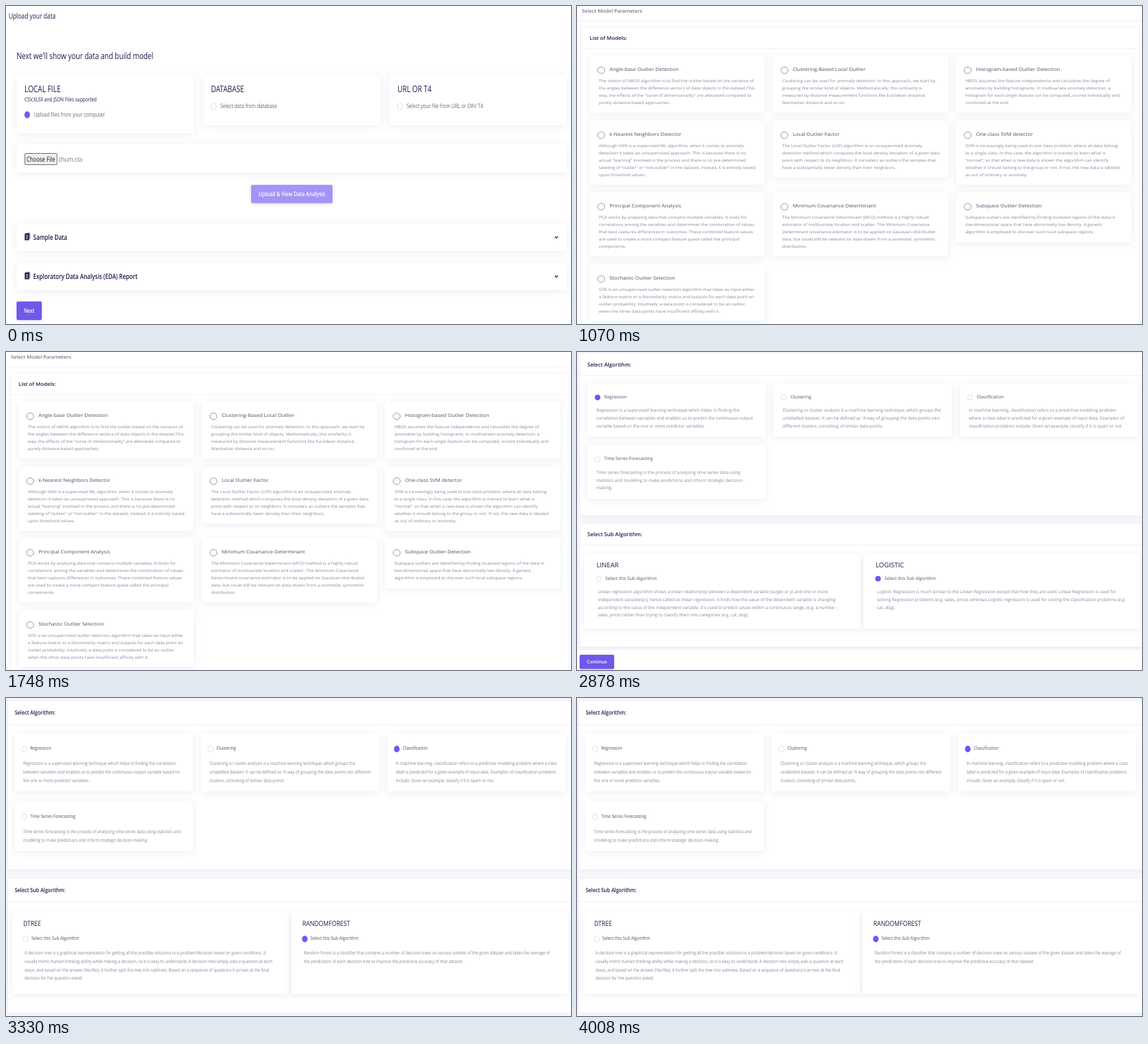
These frames come from a looping animation (853x480 px, 4.46 s). An HTML page:

```html
<!DOCTYPE html>
<html lang="en">
<head>
<meta charset="utf-8">
<title>Model builder walkthrough</title>
<style>
  html, body { margin: 0; width: 100%; height: 100%; overflow: hidden; background: #fff; }
  svg { position: absolute; left: 0; top: 0; width: 853px; height: 480px; }
  text { font-family: "Open Sans", "Noto Sans", sans-serif; text-rendering: geometricPrecision; white-space: pre; }
  .card { fill: #fff; filter: drop-shadow(0 2px 6px rgba(84, 92, 170, .11)); }
  .panel { fill: #fff; filter: drop-shadow(0 1px 4px rgba(84, 92, 170, .12)); }
  .btn { filter: drop-shadow(0 1px 2px rgba(90, 70, 200, .25)); }
</style>
</head>
<body>
<script>
const NS = "http://www.w3.org/2000/svg";
const INK = "#21184c", LABEL = "#4c4a68", SOFT = "#85849b", VIOLET = "#6f57ee";

function add(parent, tag, attrs, content) {
  const node = document.createElementNS(NS, tag);
  for (const key in attrs) node.setAttribute(key, attrs[key]);
  if (content) node.textContent = content;
  parent.appendChild(node);
  return node;
}

// One screen; tall is the height-to-width ratio of everything on it.
function makeScreen(tall, back = "#fff") {
  const svg = add(document.body, "svg", { viewBox: "0 0 853 480" });
  const box = (x1, y1, x2, y2, attrs) =>
    add(svg, "rect", { x: x1, y: y1, width: x2 - x1, height: y2 - y1, ...attrs });
  box(0, 0, 853, 480, { fill: back });

  const text = (x, midY, size, str, fill = INK, weight = 400, anchor = "start") =>
    add(svg, "text", {
      transform: `translate(${x} ${midY + 0.33 * size * tall}) scale(1 ${tall})`,
      "font-size": size, "font-weight": weight, fill, "text-anchor": anchor
    }, str);

  return {
    svg, box, text,
    card: (x1, y1, x2, y2) => box(x1, y1, x2, y2, { class: "card", rx: 2 }),
    panel: (x1, y1, x2, y2) => box(x1, y1, x2, y2, { class: "panel", rx: 2 }),
    rule: (x1, x2, y) => box(x1, y, x2, y + 1, { fill: "#f1f1f7" }),
    lines: (x, y, step, size, str, fill = SOFT) =>
      str.split("|").forEach((line, i) => text(x, y + i * step, size, line, fill)),
    radio: (cx, cy, rx, ry, on, stroke = "#d6d6df") =>
      add(svg, "ellipse", { cx, cy, rx, ry, fill: on ? VIOLET : "#fff", stroke: on ? VIOLET : stroke, "stroke-width": .8 }),
    button(x1, y1, x2, y2, size, str, fill) {
      box(x1, y1, x2, y2, { class: "btn", rx: 2, fill });
      text((x1 + x2) / 2, (y1 + y2) / 2, size, str, "#fff", 600, "middle");
    }
  };
}

function uploadScreen() {
  const s = makeScreen(1.3);
  s.text(4, 15, 8.78, "Upload your data");
  s.text(16, 75.5, 10.43, "Next we'll show your data and build model");

  const sources = [
    [16, 192, "LOCAL FILE", "Upload files from your computer", 163.5],
    [297.5, 180, "DATABASE", "Select data from database", 151],
    [579, 180, "URL OR T4", "Select your file from URL or OKV T4", 151]
  ];
  sources.forEach(([x, bottom, head, label, y], i) => {
    s.card(x, 104, x + 267.5, bottom);
    s.text(x + 12, 125, 10.5, head);
    s.radio(x + 16, y + .7, 3.8, 4.9, i === 0);
    s.text(x + 26, y, 7.05, label, "#65637d");
  });
  s.text(28, 141, 6.69, "CSV,XLSX and JSON Files supported");

  s.card(16, 208, 847, 252);
  s.box(28.5, 222.5, 77, 239.5, { fill: "#efefef", stroke: "#6b6b6b", rx: 1 });
  s.text(31, 231.5, 8.06, "Choose File", "#16161c");
  s.text(79.5, 231.5, 8.1, "churn.csv", "#62728a");
  s.button(370, 270, 493, 297.5, 7.3, "Upload & View Data Analysis", "#a594f5");

  [[328, "Sample Data"], [387, "Exploratory Data Analysis (EDA) Report"]].forEach(([y, str]) => {
    s.card(16, y, 847, y + 42);
    s.box(30, y + 14.3, 36.5, y + 23.5, { fill: "#8d88ab" });
    s.box(28.3, y + 15.5, 35, y + 25.5, { fill: INK });
    for (const dy of [18, 20.3, 22.6]) s.box(30, y + dy, 33.4, y + dy + .9, { fill: "#fff" });
    s.text(41, y + 21.3, 8.43, str, INK, 600);
    add(s.svg, "path", {
      d: `M828.8 ${y + 19.8}l2.2 2.6 2.2-2.6`, fill: "none", stroke: "#39355a", "stroke-width": 1.5
    });
  });
  s.button(16, 446, 54, 474, 7.1, "Next", "#7158e8");
  return s.svg;
}

function modelScreen() {
  const s = makeScreen(.9);
  s.text(7.5, 8, 7.85, "Select Model Parameters", LABEL);
  s.rule(0, 853, 22);
  s.panel(8, 33, 848, 490);
  s.text(19, 49, 8.1, "List of Models:", INK, 600);
  s.rule(8, 848, 64);

  const rows = [[75, 161, 161, 161], [173, 270, 259, 270], [281, 378, 378, 357], [390, 475]];
  const models = [
    ["Angle-base Outlier Detection", "The notion of ABOD algorithm is to find the outlier based on the variance of|the angles between the difference vectors of data objects in the dataset.This|way, the effects of the “curse of dimensionality” are alleviated compared to|purely distance-based approaches."],
    ["Clustering-Based Local Outlier", "Clustering can be used for anomaly detection. In this approach, we start by|grouping the similar kind of objects. Mathematically, this similarity is|measured by distance measurement functions like Euclidean distance,|Manhattan distance and so on."],
    ["Histogram-based Outlier Detection", "HBOS assumes the feature independence and calculates the degree of|anomalies by building histograms. In multivariate anomaly detection, a|histogram for each single feature can be computed, scored individually and|combined at the end."],
    ["k-Nearest Neighbors Detector", "Although kNN is a supervised ML algorithm, when it comes to anomaly|detection it takes an unsupervised approach. This is because there is no|actual “learning” involved in the process and there is no pre-determined|labeling of “outlier” or “not-outlier” in the dataset, instead, it is entirely based|upon threshold values."],
    ["Local Outlier Factor", "The Local Outlier Factor (LOF) algorithm is an unsupervised anomaly|detection method which computes the local density deviation of a given data|point with respect to its neighbors. It considers as outliers the samples that|have a substantially lower density than their neighbors."],
    ["One-class SVM detector", "SVM is increasingly being used in one class problem, where all data belong|to a single class. In this case, the algorithm is trained to learn what is|“normal”, so that when a new data is shown the algorithm can identify|whether it should belong to the group or not. If not, the new data is labeled|as out of ordinary or anomaly."],
    ["Principal Component Analysis", "PCA works by analyzing data that contains multiple variables. It looks for|correlations among the variables and determines the combination of values|that best captures differences in outcomes. These combined feature values|are used to create a more compact feature space called the principal|components."],
    ["Minimum Covariance Determinant", "The Minimum Covariance Determinant (MCD) method is a highly robust|estimator of multivariate location and scatter. The Minimum Covariance|Determinant covariance estimator is to be applied on Gaussian-distributed|data, but could still be relevant on data drawn from a unimodal, symmetric|distribution."],
    ["Subspace Outlier Detection", "Subspace outliers are identified by finding localized regions of the data in|low-dimensional space that have abnormally low density. A genetic|algorithm is employed to discover such local subspace regions."],
    ["Stochastic Outlier Selection", "SOS is an unsupervised outlier-selection algorithm that takes as input either|a feature matrix or a dissimilarity matrix and outputs for each data point an|outlier probability. Intuitively, a data point is considered to be an outlier|when the other data points have insufficient affinity with it."]
  ];
  models.forEach(([name, about], i) => {
    const col = i % 3, row = rows[Math.floor(i / 3)], top = row[0];
    const x = 19 + 276.7 * col;
    s.card(x, top, x + 264.5, row[col + 1]);
    s.radio(x + 17.5, top + 22, 5.3, 5, false, "#7c7c86");
    s.text(x + 30, top + 20.3, 7.82, name, LABEL);
    s.lines(x + 14, top + 38.5, 10.8, 6.66, about);
  });
  return s.svg;
}

// Algorithm picker: o holds the screen's geometry, type sizes and content.
function pickScreen(o) {
  const s = makeScreen(o.tall, "#f9f9fc");
  const { label, body, head, title } = o.size;
  const ry = 3.9 * o.tall;

  o.panels.forEach(([top, bottom, ruleY, titleY, str]) => {
    s.panel(o.left, top, 860, bottom);
    s.rule(o.left, 853, ruleY);
    s.text(o.cardX, titleY, title, str, INK, 600);
  });

  o.algos.forEach(([name, about], i) => {
    const x = o.cardX + 281.2 * (i % 3), [top, bottom] = o.rows[i < 3 ? 0 : 1];
    s.card(x, top, x + 269, bottom);
    s.radio(x + o.radioX, top + o.labelY + .9, 3.9, ry, i === o.chosen);
    s.text(x + o.labelX, top + o.labelY, label, name, LABEL);
    s.lines(x + o.bodyX, top + o.bodyY, o.step, body, about);
  });

  const [top, bottom] = o.subBox;
  o.subs.forEach(([name, about], i) => {
    const x = o.subX + 421.5 * i;
    s.card(x, top, x + 418, bottom);
    s.text(x + o.subHeadX, top + o.subY[0], head, name);
    s.radio(x + o.subHeadX + 3.6, top + o.subY[1] + .9, 3.9, ry, i === 1);
    s.text(x + o.subHeadX + o.subGap, top + o.subY[1], label, "Select this Sub Algorithm", LABEL);
    s.lines(x + o.subHeadX + 2, top + o.subY[2], o.step, body, about);
  });
  return s;
}

function regressionScreen() {
  const s = pickScreen({
    tall: 1, left: 4, cardX: 15.8, radioX: 15.2, labelX: 25.2, bodyX: 13.5,
    labelY: 20.7, bodyY: 41.3, step: 11.75, chosen: 0,
    size: { label: 6.7, body: 6.48, head: 9.97, title: 8.05 },
    panels: [[2, 247, 35, 19, "Select Algorithm:"], [259, 445, 291, 275.5, "Select Sub Algorithm:"]],
    rows: [[47, 128], [140.5, 222]],
    algos: [
      ["Regression", "Regression is a supervised learning technique which helps in finding the|correlation between variables and enables us to predict the continuous output|variable based on the one or more predictor variables."],
      ["Clustering", "Clustering or cluster analysis is a machine learning technique, which groups the|unlabelled dataset. It can be defined as \"A way of grouping the data points into|different clusters, consisting of similar data points."],
      ["Classification", "In machine learning, classification refers to a predictive modeling problem|where a class label is predicted for a given example of input data. Examples of|classification problems include: Given an example, classify if it is spam or not."],
      ["Time Series Forecasting", "Time series forecasting is the process of analyzing time series data using|statistics and modeling to make predictions and inform strategic decision-|making."]
    ],
    subX: 11, subBox: [305, 418], subHeadX: 18.4, subGap: 13.4, subY: [16.5, 36.3, 57],
    subs: [
      ["LINEAR", "Linear regression algorithm shows a linear relationship between a dependent variable (target or y) and one or more|independent variables[x], hence called as linear regression. It finds how the value of the dependent variable is changing|according to the value of the independent variable. It's used to predict values within a continuous range, (e.g. a number -|sales, price) rather than trying to classify them into categories (e.g. cat, dog)."],
      ["LOGISTIC", "Logistic Regression is much similar to the Linear Regression except that how they are used. Linear Regression is used for|solving Regression problems (e.g. sales, price), whereas Logistic regression is used for solving the classification problems (e.g.|cat, dog)."]
    ]
  });
  s.box(0, 450, 853, 480, { fill: "#fff" });
  s.button(4, 457, 56, 478.5, 6.9, "Continue", "#7158e8");
  return s.svg;
}

function classificationScreen() {
  return pickScreen({
    tall: 1.17, left: 3, cardX: 13.2, radioX: 14.4, labelX: 23.3, bodyX: 12.8,
    labelY: 23, bodyY: 46, step: 12.7, chosen: 2,
    size: { label: 6.22, body: 5.96, head: 9, title: 7.46 },
    panels: [[5, 259, 40, 22.5, "Select Algorithm:"], [273, 475, 307, 290.5, "Select Sub Algorithm:"]],
    rows: [[53, 141], [155.7, 231]],
    algos: [
      ["Regression", "Regression is a supervised learning technique which helps in finding the correlation|between variables and enables us to predict the continuous output variable based on|the one or more predictor variables."],
      ["Clustering", "Clustering or cluster analysis is a machine learning technique, which groups the|unlabelled dataset. It can be defined as \"A way of grouping the data points into different|clusters, consisting of similar data points."],
      ["Classification", "In machine learning, classification refers to a predictive modeling problem where a class|label is predicted for a given example of input data. Examples of classification problems|include: Given an example, classify if it is spam or not."],
      ["Time Series Forecasting", "Time series forecasting is the process of analyzing time series data using statistics and|modeling to make predictions and inform strategic decision-making."]
    ],
    subX: 9.5, subBox: [323, 447], subHeadX: 16.5, subGap: 12.3, subY: [17.5, 39.8, 62],
    subs: [
      ["DTREE", "A decision tree is a graphical representation for getting all the possible solutions to a problem/decision based on given conditions. It|usually mimic human thinking ability while making a decision, so it is easy to understand. A decision tree simply asks a question at each|steps, and based on the answer (Yes/No), it further split the tree into subtrees. Based on a sequence of questions it arrives at the final|decision for the question asked."],
      ["RANDOMFOREST", "Random Forest is a classifier that contains a number of decision trees on various subsets of the given dataset and takes the average of|the predictions of each decision tree to improve the predictive accuracy of that dataset."]
    ]
  }).svg;
}

const LOOP = 4460;
const show = [
  [0, uploadScreen()],
  [1070, modelScreen()],
  [2200, regressionScreen()],
  [3330, classificationScreen()]
];

function draw() {
  const t = performance.now() % LOOP;
  show.forEach(([start, svg], i) => {
    const end = i + 1 < show.length ? show[i + 1][0] : LOOP;
    svg.style.visibility = t >= start && t < end ? "visible" : "hidden";
  });
  requestAnimationFrame(draw);
}
draw();
</script>
</body>
</html>
```
